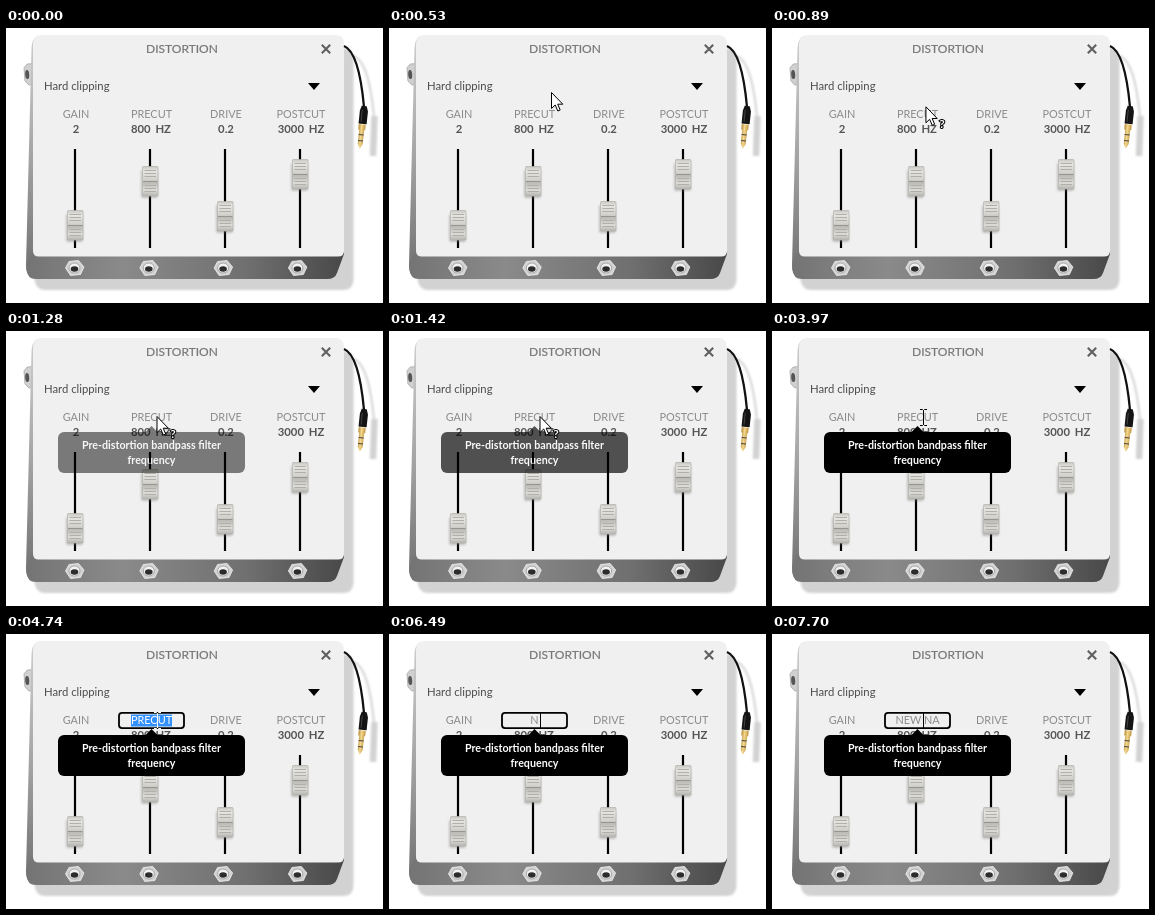
An HTML page that plays this animation: 377x275 px, repeating every 8 s.

```html
<!DOCTYPE html>
<html lang="en">
<head>
<meta charset="utf-8">
<title>Distortion</title>
<style>
  html, body { margin: 0; width: 100%; height: 100%; overflow: hidden; background: #fff; }
  svg { display: block; font: 10.9px Lato, "Open Sans", sans-serif; cursor: default; }
  text { text-anchor: middle; white-space: pre; }
  .label { fill: #8b8b8b; }
  .value { fill: #555; font-weight: bold; font-size: 11.3px; word-spacing: 2px; }
  .tip { fill: #fff; font-weight: bold; font-size: 10.7px; }
  .mark { fill: #fff; stroke: #000; stroke-width: 2px; paint-order: stroke; font-weight: bold; font-size: 12px; }
</style>
</head>
<body>
<svg width="377" height="275" viewBox="0 0 377 275">
  <defs>
    <linearGradient id="front">
      <stop offset="0" stop-color="#747474"/><stop offset=".3" stop-color="#8a8a8a"/>
      <stop offset=".7" stop-color="#6f6f6f"/><stop offset="1" stop-color="#484848"/>
    </linearGradient>
    <linearGradient id="side" x2="0" y2="1">
      <stop offset="0" stop-color="#cfcfcf"/><stop offset=".5" stop-color="#a4a4a4"/><stop offset="1" stop-color="#707070"/>
    </linearGradient>
    <linearGradient id="cap" x2="0" y2="1">
      <stop offset="0" stop-color="#c9c8c3"/><stop offset=".15" stop-color="#e6e5e1"/>
      <stop offset=".45" stop-color="#d2d1cc"/><stop offset=".55" stop-color="#bcbbb6"/>
      <stop offset=".8" stop-color="#dddcd8"/><stop offset="1" stop-color="#b5b4af"/>
    </linearGradient>
    <linearGradient id="gold">
      <stop offset="0" stop-color="#b58a35"/><stop offset=".45" stop-color="#f3d890"/><stop offset="1" stop-color="#c0933c"/>
    </linearGradient>
    <filter id="soft" x="-30%" y="-30%" width="160%" height="160%"><feGaussianBlur stdDeviation="1.2"/></filter>
    <g id="jack">
      <path d="M-9 0-5.500-6.500 4-7.500 9.500-1 6 6.500-4 7.500Z" fill="#d2d2d2" stroke="#efefef" stroke-width=".8" stroke-linejoin="round"/>
      <ellipse rx="5.500" ry="5" fill="#f2f2f2" stroke="#999" stroke-width=".8"/>
      <ellipse cy="1" rx="3.800" ry="2.800" fill="#2c2c2c"/>
    </g>
    <g id="knob">
      <rect x="-9" y="-11" width="17" height="28" rx="2" fill="#777" opacity=".4" filter="url(#soft)"/>
      <rect x="-7.500" y="-14.500" width="15.500" height="29.500" rx=".8" fill="url(#cap)" stroke="#b4b3ae" stroke-width=".7"/>
      <path d="M-5.500-10.500H6M-5.500-7.500H6M-5.500-4.500H6M-5.500 4.500H6M-5.500 7.500H6M-5.500 10.500H6" stroke="#b0afaa"/>
      <path d="M-7 .5H7.500" stroke="#96958f"/>
    </g>
    <path id="cable" d="M338 18Q353 24 358 79" fill="none"/>
  </defs>

  <!-- pedal body -->
  <path d="M40 20H336Q347 20 347.500 30V252Q347 262 337 262H39Q29 262 28 248Z" fill="#d2d2d2" filter="url(#soft)"/>
  <g transform="translate(22 46.500) rotate(-4)">
    <path d="M-3.500-7 0-10.500H6V10.500H0L-3.500 6Z" fill="#d0d0d0" stroke="#a8a8a8" stroke-width=".8"/>
    <ellipse cx="-.8" rx="2" ry="4.500" fill="#555"/>
  </g>
  <path d="M31 8Q26 11 25.500 20L20 237Q20 247 27 249L40 225V12Z" fill="url(#side)"/>
  <path d="M27 221 20.300 236V241Q21 251 30 251H321Q329 251 331 245L338 226V218Z" fill="url(#front)"/>
  <path d="M27 16Q27 7 36 7H329Q338 7 338 16V223Q338 228.500 332 228.500H33Q27 228.500 27 223Z" fill="#f0f0f0"/>

  <!-- cable and plug -->
  <g fill="none" stroke="#bbb" opacity=".65" filter="url(#soft)">
    <use href="#cable" x="10" y="10" stroke-width="2"/>
    <path d="M368.500 88 367 128" stroke-width="6.500"/>
  </g>
  <use href="#cable" stroke="#111" stroke-width="2.300"/>
  <g transform="translate(358.200 78) rotate(6)">
    <path d="M-2.500 0H2.500L4.300 5V18H-3.800V5Z" fill="#141414"/>
    <path d="M-1.500 4V16" stroke="#444"/>
    <path d="M-3.500 18.500H3.500V24H2.500V38L0 43-2.500 38V24H-3.500Z" fill="url(#gold)"/>
    <path d="M-2.500 29H2.500M-2.500 35H2.500" stroke="#444"/>
  </g>

  <text x="176" y="25" fill="#777" stroke="#777" stroke-width=".2" font-size="12">DISTORTION</text>
  <path d="M315.800 16.800 324.200 25.200M324.200 16.800 315.800 25.200" stroke="#606060" stroke-width="2.100"/>
  <text x="38" y="62" fill="#4c4c4c" font-size="11.300" style="text-anchor:start">Hard clipping</text>
  <path d="M302 55H314L308 62Z"/>
  <g id="controls"></g>

  <g id="field">
    <rect id="select" x="125" y="80.500" width="41" height="12" fill="#3390ff"/>
    <text id="name" class="label" x="145.500" y="90"></text>
    <rect id="ring" x="113" width="65" rx="3" fill="none" stroke="#000" stroke-width="1.800"/>
  </g>
  <g id="tooltip">
    <path d="M139 101.500 145.500 95 152 101.500Z"/>
    <rect x="52" y="101" width="187" height="41" rx="6"/>
    <text class="tip" x="145.500" y="118">Pre-distortion bandpass filter</text>
    <text class="tip" x="145.500" y="133">frequency</text>
  </g>

  <g id="pointer">
    <path d="M.5.5V16.500L4.200 13 6.800 19 9.200 18 6.700 12.200H11.800Z" fill="#fff" stroke="#000" stroke-linejoin="round"/>
    <text id="help" class="mark" x="16.500" y="21.500">?</text>
  </g>
  <path id="beam" d="M148 78.500H150.500L151.500 79.500 152.500 78.500H155M151.500 79.500V94M148 94.500H150.500L151.500 93.500 152.500 94.500H155" fill="none"/>
</svg>
<script>
const $ = id => document.getElementById(id);
const LOOP = 8000;

// label, value, knob height; the second label is the editable field
const controls = [["GAIN", "2", 197], ["", "800 HZ", 153], ["DRIVE", "0.2", 188], ["POSTCUT", "3000 HZ", 146]];
$("controls").innerHTML = controls.map(([label, value, y], i) => {
  const x = 69 + 75 * i;
  return `
    <text class="label" x="${x + 1}" y="90">${label}</text>
    <text class="value" x="${x + 1}" y="105">${value}</text>
    <path d="M${x} 121V220" stroke="#000" stroke-width="2.2"/>
    <use href="#knob" x="${x}" y="${y}"/>
    <use href="#jack" x="${68.5 + 74.3 * i}" y="240"/>`;
}).join("");

// time, x, y
const path = [[70, 320, 275], [300, 222, 135], [500, 162, 64], [600, 162, 64], [870, 154, 77], [1000, 150.5, 85]];
const typed = [[0, "PRECUT"], [6490, "N"], [6810, "NE"], [7090, "NEW"], [7350, "NEW "], [7540, "NEW N"], [7700, "NEW NA"]];

const ramp = (t, from, to) => Math.min(1, Math.max(0, (t - from) / (to - from)));
const show = (id, on) => $(id).style.display = on ? "" : "none";

function pointerAt(t) {
  const next = path.findIndex(p => p[0] > t);
  if (next < 0) return path.at(-1).slice(1);
  if (next === 0) return path[0].slice(1);
  const [a, b] = [path[next - 1], path[next]];
  const k = ramp(t, a[0], b[0]);
  return [a[1] + (b[1] - a[1]) * k, a[2] + (b[2] - a[2]) * k];
}

function draw(t) {
  const selected = t >= 4490 && t < 6490, overText = t >= 3970;
  show("pointer", t >= 70 && !overText);
  show("help", t >= 890);
  $("pointer").setAttribute("transform", `translate(${pointerAt(t)})`);
  show("beam", overText);
  $("beam").setAttribute("stroke", selected ? "#fff" : "#000");

  $("tooltip").style.opacity = ramp(t, 890, 1690);
  show("select", selected);
  $("name").textContent = typed.findLast(s => s[0] <= t)[1];
  $("name").style.fill = selected ? "#fff" : "";

  // the focus ring tightens as it fades in
  const focus = ramp(t, 4450, 4740), height = 22 - 6.8 * focus;
  $("ring").style.opacity = focus;
  $("ring").setAttribute("y", 86.5 - height / 2);
  $("ring").setAttribute("height", height);
}

const start = performance.now();
function tick() {
  draw((performance.now() - start) % LOOP);
  requestAnimationFrame(tick);
}
tick();
</script>
</body>
</html>
```
